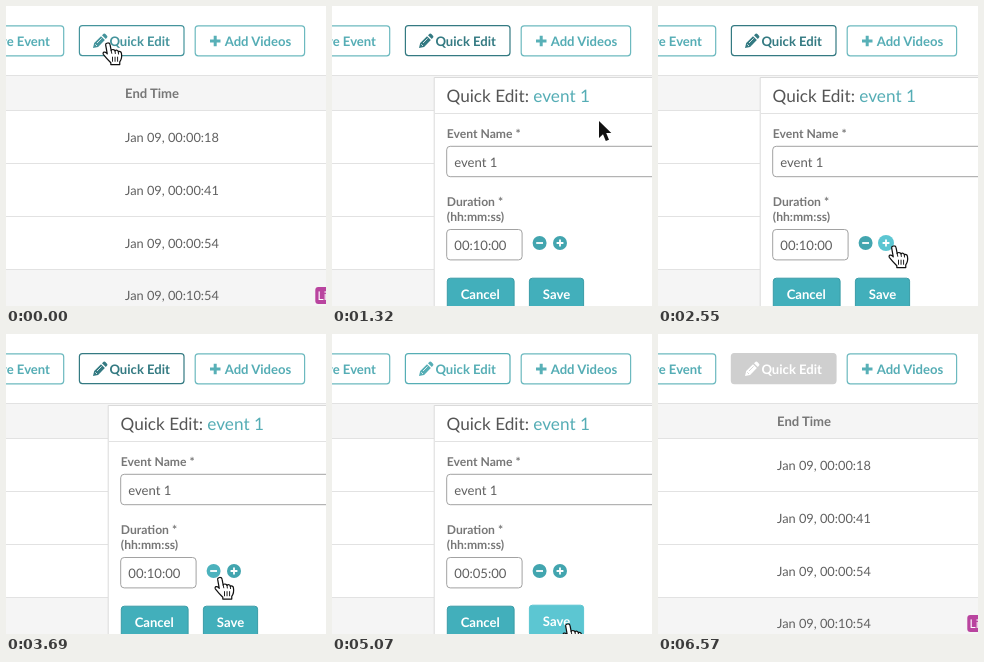
An HTML page that plays this animation: 320x300 px, repeating every 6.81 s.

```html
<!DOCTYPE html>
<html lang="en">
<head>
<meta charset="utf-8">
<title>Quick edit panel</title>
<style>
  html, body { margin: 0; width: 100%; height: 100%; overflow: hidden; background: #fff; }
  svg { display: block; font: 13.1px Lato, sans-serif; fill: #606060; text-rendering: geometricPrecision; }
  .bold { font-weight: 700; }
  .mid { text-anchor: middle; }
  .head { fill: #777; }
  .row { font-size: 12.8px; }
  .label { font-size: 12.15px; font-weight: 700; fill: #777; }
  .title { font-size: 17.2px; fill: #555; }
  .accent { fill: #55adb5; }
  .line { stroke: #e2e2e2; fill: none; }
  .box { fill: #fff; stroke: #a2a2a2; }
  .outline { fill: #fff; stroke: #6cb9bf; stroke-width: 1.2; }
  .solid { fill: #42afbb; stroke: #3a9ca7; }
  .white { fill: #fff; }
  .sign { stroke: #fff; stroke-width: 1.8; fill: none; }
  .cursor { stroke-linejoin: round; stroke-linecap: round; }
</style>
</head>
<body>
<svg width="320" height="300" viewBox="0 0 320 300">
  <rect class="white" width="320" height="300"/>

  <g class="bold accent">
    <rect class="outline" x="-60" y="19.8" width="117.7" height="30" rx="3"/>
    <text x="44" y="39.9" text-anchor="end">Remove Event</text>
    <rect class="outline" x="189.2" y="19.8" width="109.4" height="30" rx="3"/>
    <path d="M204 35H214.5M209.2 29.8V40.2" stroke="#58b0b7" stroke-width="3"/>
    <text class="mid" x="252" y="39.9">Add Videos</text>
  </g>

  <g id="quick" class="bold">
    <rect id="quickBox" x="73.4" y="19.6" width="104.6" height="30" rx="3" stroke-width="1.2"/>
    <path d="M87 42L88.2 37L95 30.2L98.9 34.1L92.1 40.9ZM96 29.2L97.6 27.8Q98.5 27.2 99.4 28L101 29.7Q101.9 30.6 101.1 31.6L99.8 33Z"/>
    <path id="pencilMark" d="M89.3 38.3L91 40M91 37L95.6 32.4" stroke-width=".8" fill="none"/>
    <text class="mid" x="133.7" y="39.7">Quick Edit</text>
  </g>

  <g id="table">
    <rect x="0" y="70" width="320" height="35" fill="#f5f5f5"/>
    <rect x="0" y="263" width="320" height="37" fill="#f5f5f5"/>
    <path class="line" d="M0 69.5H320M0 104.5H320M0 157.5H320M0 210.5H320M0 263.5H320"/>
    <text class="bold head" x="119" y="92">End Time</text>
  </g>
  <g>
    <rect x="309.3" y="281" width="40" height="17" rx="3" fill="#b9449f"/>
    <text class="white" x="311.5" y="294" font-size="12">Live</text>
  </g>

  <g id="panel">
    <rect class="white" x="102" y="71" width="218" height="229"/>
    <path class="line" d="M102.2 300V71.5H320" style="stroke:#dadada"/>
    <path class="line" d="M103 107.5H320"/>
    <text class="title" x="114.5" y="96">Quick Edit: <tspan class="accent">event 1</tspan></text>
    <text class="label" x="114.8" y="132.2">Event Name *</text>
    <rect class="box" x="114.7" y="140.3" width="240" height="30.4" rx="3.5"/>
    <text x="122.2" y="160.5">event 1</text>
    <text class="label" x="114.8" y="200.3">Duration *</text>
    <text class="label" x="114.8" y="214.7">(hh:mm:ss)</text>
    <rect class="box" x="114.7" y="223.5" width="75.4" height="30.4" rx="3.5"/>
    <text id="duration" x="122.3" y="243.8">00:10:00</text>
    <circle id="minus" cx="207.6" cy="237" r="7"/>
    <path class="sign" d="M204.2 237H211"/>
    <circle id="plus" cx="228" cy="237" r="7"/>
    <path class="sign" d="M224.6 237H231.4M228 233.6V240.4"/>
    <rect class="solid" x="115.3" y="272.2" width="66.8" height="31" rx="3"/>
    <rect id="save" x="197.4" y="272.2" width="54.2" height="31" rx="3"/>
    <g class="bold white mid">
      <text x="148.2" y="292.5">Cancel</text>
      <text id="saveText" x="224.5" y="292.5">Save</text>
    </g>
  </g>

  <g id="hand" class="cursor" fill="#fff" stroke="#111" stroke-width="1.3">
    <path d="M-2.5 2C-2.6-.6 1.9-.7 2.2 1.8L3.4 8C4 6.5 7 6.5 7.5 8.5C8.5 7 11 7.5 11 9.5C12 8.5 14.1 9 14.3 11C15 15 14 18 12.5 20V23H3V21C0 18-3 14.5-5 12C-6 9.8-3.4 8.6-1.5 10.8L-.8 11.5Z"/>
    <path d="M3.4 8L4 11M7.5 8.5L7.8 11.2M11 9.5L11.2 11.8M4.8 15V19.5M7.5 15V19.5M10.2 15V19.5" fill="none" stroke-width="1"/>
  </g>
  <path id="arrow" class="cursor" d="M0 0V17L4 13.2L6.8 20L10 18.7L7.2 12.1H12.3Z" fill="#111" stroke="#fff" stroke-width="1.1" paint-order="stroke"/>
</svg>

<script>
const LOOP = 6810, STEP = 30;
const $ = id => document.getElementById(id);
const set = (id, attrs) => {
  for (const key in attrs) $(id).setAttribute(key, attrs[key]);
};

const ease = {
  lin: p => p,
  in: p => p ** 1.6,
  out: p => 1 - (1 - p) ** 2,
  io: p => p * p * (3 - 2 * p)
};

// time, x, y, easing towards this point
const path = [
  [0, 102, 37, 'lin'],
  [30, 102, 37, 'lin'],
  [150, 128.5, 37.5, 'out'],
  [930, 128.5, 37.5, 'lin'],
  [1320, 267, 115, 'in'],
  [1560, 257, 267, 'out'],
  [1830, 257, 267, 'lin'],
  [2490, 236, 241, 'io'],
  [2550, 236, 240, 'lin'],
  [3240, 236, 240, 'lin'],
  [3690, 214, 243.5, 'io'],
  [4530, 214, 243.5, 'lin'],
  [5070, 236, 290, 'io'],
  [5790, 236, 290, 'lin'],
  [5910, 233, 294, 'out'],
  [6150, 233, 294, 'lin'],
  [6420, 229, 306, 'in'],
  [LOOP, 229, 306, 'lin']
];

const ramp = (t, a, b) => Math.min(1, Math.max(0, (t - a) / (b - a)));
const lerp = (a, b, p) => a + (b - a) * p;
const mix = (a, b, p) => `rgb(${a.map((v, i) => Math.round(lerp(v, b[i], p)))})`;

const TEAL = [86, 174, 181], DARK = [52, 122, 130], GREY = [207, 207, 207];
const FILL = [66, 165, 175], BRIGHT = [92, 198, 210], WHITE = [255, 255, 255];

function pointAt(t) {
  const i = Math.max(1, path.findIndex(k => k[0] > t));
  const [t0, x0, y0] = path[i - 1], [t1, x1, y1, kind] = path[i];
  const p = ease[kind](ramp(t, t0, t1));
  return [lerp(x0, x1, p), lerp(y0, y1, p)];
}

function drawCursor(t) {
  const [x, y] = pointAt(t);
  const onQuick = t < 1200 && x < 178 && y < 50;
  const onSigns = t >= 2250 && t < 5310 && y < 249;
  const onSave = t >= 4530 && t < 5340 && y > 271;
  const isHand = onQuick || onSigns || onSave;
  const at = `translate(${x} ${y})`;
  set('hand', { transform: `${at} scale(.94)`, visibility: isHand ? 'visible' : 'hidden' });
  set('arrow', { transform: at, visibility: isHand ? 'hidden' : 'visible' });
}

function drawQuick(t) {
  const dark = lerp(0.5, 1, ramp(t, 750, 930)) * (1 - ramp(t, 3960, 4260));
  const off = ramp(t, 5310, 5460);
  const tone = off ? mix(TEAL, WHITE, off) : mix(TEAL, DARK, dark);
  const back = mix(WHITE, GREY, off);
  set('quick', { fill: tone });
  set('quickBox', { fill: back, stroke: off ? mix(TEAL, GREY, off) : tone });
  set('pencilMark', { stroke: back });
}

function drawPanel(t) {
  const shown = ease.out(ramp(t, 300, 540)) * (1 - ease.in(ramp(t, 5310, 5460)));
  set('panel', {
    transform: `translate(${220 * (1 - shown)} 0)`,
    visibility: shown > 0 ? 'visible' : 'hidden'
  });
  $('duration').textContent = t < 3990 ? '00:10:00' : '00:05:00';

  const plus = ramp(t, 2340, 2520) * (1 - ramp(t, 3360, 3510));
  const minus = ramp(t, 3510, 3690) * (1 - ramp(t, 4620, 4770));
  const save = ramp(t, 4890, 5040);
  set('plus', { fill: mix(FILL, BRIGHT, plus), r: 7 + plus });
  set('minus', { fill: mix(FILL, BRIGHT, minus * 0.4) });
  set('save', {
    fill: mix([66, 175, 187], BRIGHT, save),
    stroke: mix([58, 156, 167], BRIGHT, save),
    y: 272.2 - save
  });
  set('saveText', { y: 292.5 - save });
}

function draw(t) {
  drawQuick(t);
  drawPanel(t);
  drawCursor(t);
}

['00:00:18', '00:00:41', '00:00:54', '00:10:54'].forEach((time, i) => {
  const row = document.createElementNS('http://www.w3.org/2000/svg', 'text');
  row.setAttribute('class', 'row');
  row.setAttribute('x', 119);
  row.setAttribute('y', 136 + i * 52.8);
  row.textContent = `Jan 09, ${time}`;
  $('table').append(row);
});

const start = performance.now();
function tick() {
  const t = (performance.now() - start) % LOOP;
  draw(Math.floor(t / STEP) * STEP);
  requestAnimationFrame(tick);
}
tick();
</script>
</body>
</html>
```
